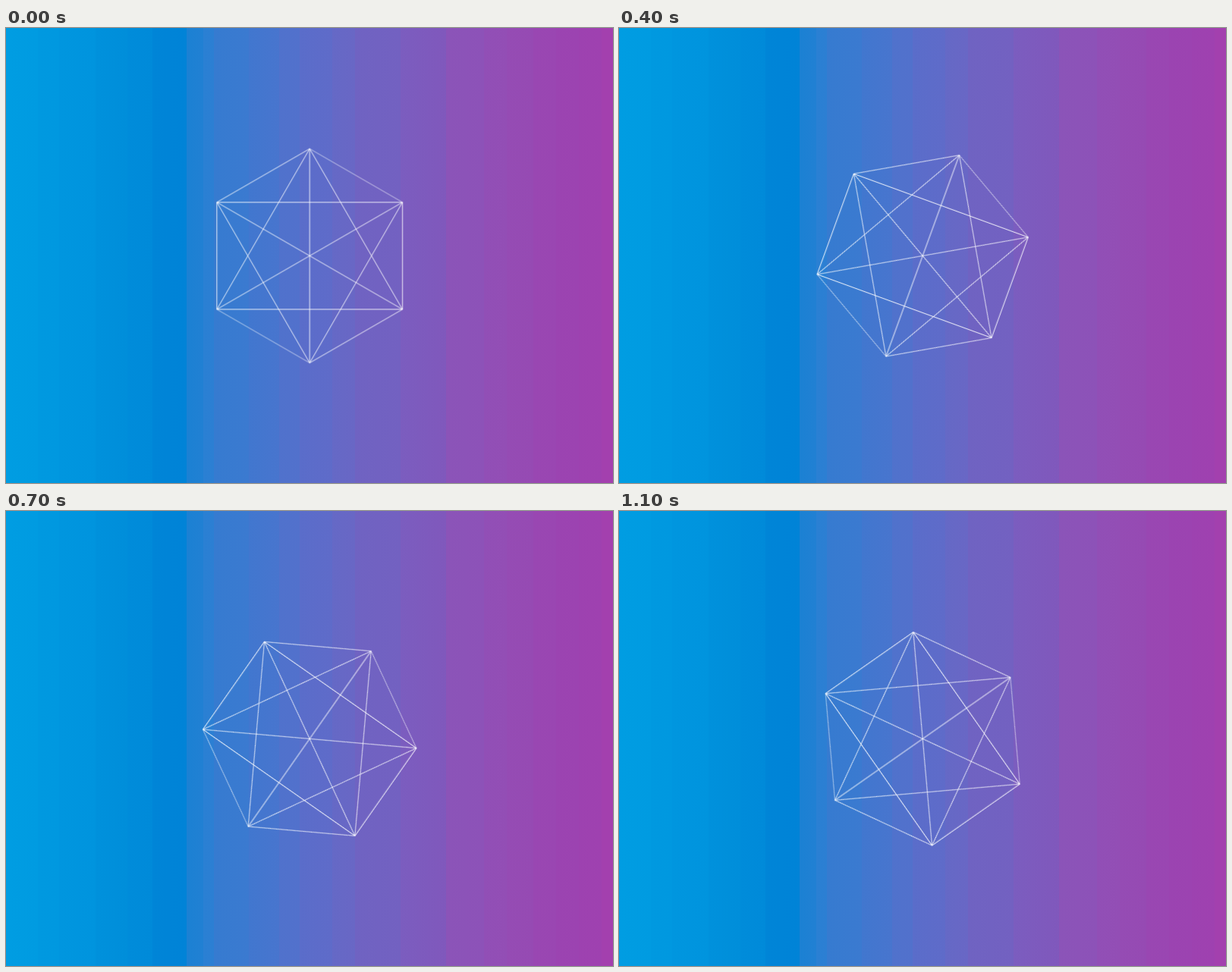
An HTML page without scripts for the animation above (1.2 s loop, 800x600 px).

```html
<!DOCTYPE html>
<html lang="en">
<head>
<meta charset="utf-8">
<title>Rotating hexagon</title>
<style>
  html, body { margin: 0; width: 100%; height: 100%; overflow: hidden; }
  body {
    background: linear-gradient(90deg,
      #009de2 0, #009be1 42px,
      #0099e0 42px, #0098e0 70px,
      #0096df 70px, #0094de 118px,
      #0091dc 118px, #008eda 160px,
      #008cda 160px, #008ad9 193px,
      #0085d7 193px, #0083d7 238px,
      #1b81d3 238px, #2180d3 260px,
      #2a80d3 260px, #2c7fd3 274px,
      #367bd0 274px, #3b7ad0 320px,
      #4177cf 320px, #4875ce 360px,
      #5072cc 360px, #5271cc 387px,
      #5a6dca 387px, #5f6bc9 430px,
      #6569c6 430px, #6967c5 460px,
      #6f63c2 460px, #7361c1 520px,
      #7b5dbf 520px, #8058bc 580px,
      #8b54b8 580px, #8d52b8 630px,
      #914fb6 630px, #934eb5 660px,
      #954cb4 660px, #964ab3 695px,
      #9947b2 695px, #9a46b2 725px,
      #9b44b1 725px, #9c43b1 755px,
      #9d42b0 755px, #9f41b0 785px,
      #a340ae 785px);
  }
  svg { display: block; width: 100%; height: 100%; }
  path { fill: none; stroke: #fff; stroke-width: 1; stroke-opacity: .88; }
  .thin { stroke-opacity: .62; }
  .spin { animation: spin 1.2s steps(12, end) infinite; transform-origin: 0 0; }
  @keyframes spin { to { transform: rotate(60deg); } }
</style>
</head>
<body>
<svg viewBox="0 0 800 600">
  <g transform="translate(400.2 300.4)">
    <g class="spin">
      <!-- outline -->
      <path class="thin" d="M0-141.2 122.3-70.6M0 141.2-122.3 70.6"/>
      <path d="M122.3-70.6V70.6L0 141.2M-122.3 70.6V-70.6L0-141.2"/>
      <!-- long diagonals -->
      <path d="M0-141.2V141.2M-122.3-70.6 122.3 70.6M-122.3 70.6 122.3-70.6"/>
      <!-- inner triangles -->
      <path d="M0-141.2 122.3 70.6H-122.3ZM0 141.2 122.3-70.6H-122.3Z" stroke-linejoin="bevel"/>
    </g>
  </g>
</svg>
</body>
</html>
```
